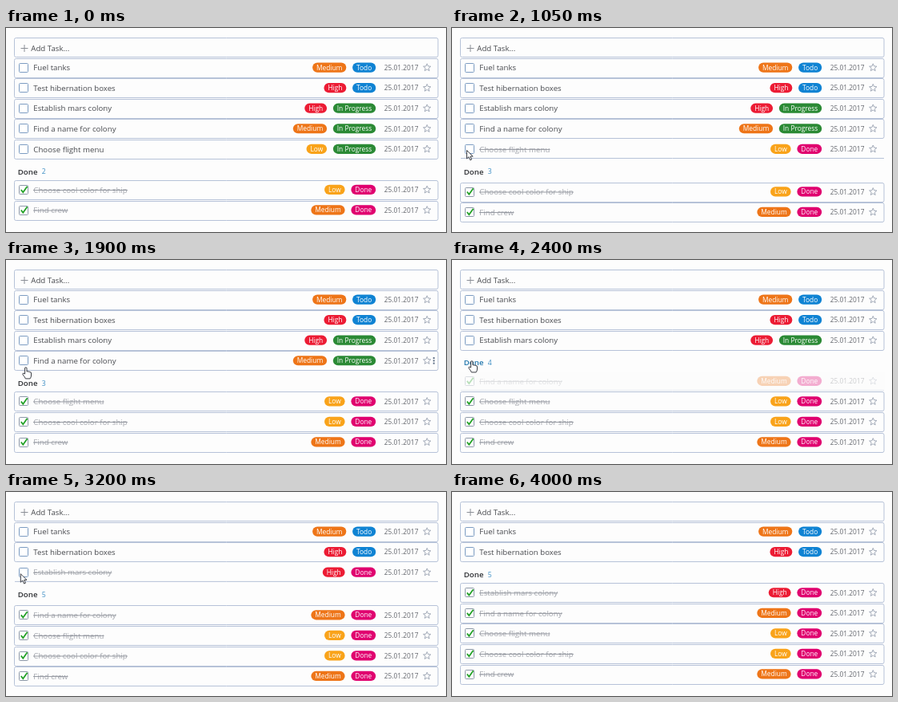
An HTML page with a canvas that plays this animation: 550 px wide and 256 px high, repeating every 4150 ms.

```html
<!DOCTYPE html>
<html lang="en">
<head>
<meta charset="utf-8">
<title>Task list</title>
<style>
html, body { margin: 0; width: 100%; height: 100%; overflow: hidden; background: #fdfdfd; }
canvas { display: block; width: 550px; height: 256px; }
</style>
</head>
<body>
<canvas id="stage" width="550" height="256"></canvas>
<script>
const ctx = document.getElementById('stage').getContext('2d');
const LOOP = 4150, STEP = 50, PITCH = 25.55;
const PAGE = '#fdfdfd', BORDER = '#b6c2d8';
const FONT = '"Open Sans", "Noto Sans", sans-serif';
const COLORS = {
  Medium: '#ee7518', High: '#ec1c34', Low: '#f9a31a',
  Todo: '#0f83d3', 'In Progress': '#2b8a35', Done: '#e0006f'
};
const TASKS = [
  { name: 'Fuel tanks', level: 'Medium', state: 'Todo' },
  { name: 'Test hibernation boxes', level: 'High', state: 'Todo' },
  { name: 'Establish mars colony', level: 'High', state: 'In Progress', click: 3150 },
  { name: 'Find a name for colony', level: 'Medium', state: 'In Progress', click: 2200 },
  { name: 'Choose flight menu', level: 'Low', state: 'In Progress', click: 1000 },
  { name: 'Choose cool color for ship', level: 'Low', state: 'Done' },
  { name: 'Find crew', level: 'Medium', state: 'Done' }
];
const MOVABLE = TASKS.filter(task => task.click);

// Pointer path: time, x, y
const PATH = [
  [50, -14, 112], [450, 19, 150], [750, 18, 153], [1300, 18, 153],
  [1700, 24.8, 136], [1900, 24.8, 135], [2150, 24.8, 127], [2450, 24.8, 127],
  [2700, 24.8, 103.2], [3150, 24.8, 103.2], [3300, -2.2, 99.5], [3400, -16, 98]
];

const clamp = v => Math.max(0, Math.min(1, v));
const ease = v => v * v * (3 - 2 * v);
const slotY = i => 49.7 + PITCH * i;

function pointerAt(t) {
  const i = PATH.findIndex(p => p[0] > t);
  if (i < 1) return null;
  const a = PATH[i - 1], b = PATH[i];
  const k = ease((t - a[0]) / (b[0] - a[0]));
  return { x: a[1] + (b[1] - a[1]) * k, y: a[2] + (b[2] - a[2]) * k };
}

function label(text, x, y, size, color, weight = 400) {
  ctx.font = `${weight} ${size}px ${FONT}`;
  ctx.fillStyle = color;
  ctx.fillText(text, x, y);
  return ctx.measureText(text).width;
}

function line(points, color, width) {
  ctx.beginPath();
  points.forEach(([x, y]) => ctx.lineTo(x, y));
  ctx.strokeStyle = color;
  ctx.lineWidth = width;
  ctx.stroke();
}

function box(x, y, w, h, r, stroke, fill) {
  ctx.beginPath();
  ctx.roundRect(x, y, w, h, r);
  if (fill) { ctx.fillStyle = fill; ctx.fill(); }
  if (stroke) { ctx.strokeStyle = stroke; ctx.lineWidth = 1; ctx.stroke(); }
}

function frame(y) {
  box(10.5, Math.round(y - 12) + 0.5, 529.5, 24, 2, BORDER, PAGE);
}

// Draws a pill ending at the given right edge, returns its left edge
function pill(text, right, y) {
  ctx.font = `400 8.4px ${FONT}`;
  const w = ctx.measureText(text).width + 9.8;
  box(right - w, y - 6.2, w, 12.2, 6.1, null, COLORS[text]);
  label(text, right - w + 4.9, y + 2.9, 8.4, '#fff');
  return right - w;
}

function star(x, y) {
  ctx.beginPath();
  for (let i = 0; i < 10; i++) {
    const a = -Math.PI / 2 + i * Math.PI / 5, r = i % 2 ? 2.2 : 4.9;
    ctx.lineTo(x + r * Math.cos(a), y + r * Math.sin(a));
  }
  ctx.closePath();
  ctx.strokeStyle = '#98a1b0';
  ctx.lineWidth = 0.9;
  ctx.stroke();
}

function row(task, y, { done, checked = done, alpha = 1, bare, hover }) {
  if (alpha === 0) return;
  if (bare) line([[11, y + 11.6], [540, y + 11.6]], BORDER, 1);
  else frame(y);
  box(16.5, Math.round(y - 6) + 0.5, 11, 11, 1, checked ? '#8d99a8' : '#7c9cc2', '#fff');
  if (checked) line([[18.8, y], [21.3, y + 3.2], [26.6, y - 4.2]], '#23a127', 1.8);
  const w = label(task.name, 34.3, y + 3.6, 9.7, done ? '#a3a6ad' : '#484a4f');
  if (done) line([[34, y + 0.5], [34.5 + w, y + 0.5]], '#969aa2', 1);
  const left = pill(done ? 'Done' : task.state, 462.2, y);
  pill(task.level, left - 7.8, y);
  label('25.01.2017', 472.8, y + 3.2, 8.35, '#62656c');
  star(526.3, y);
  if (hover) {
    ctx.fillStyle = '#64748a';
    for (let i = -1; i < 2; i++) ctx.fillRect(533.8, y - 1 + i * 3.3, 2, 2);
  }
  // Fade the row as a whole under a veil of the page colour
  ctx.globalAlpha = 1 - alpha;
  ctx.fillStyle = PAGE;
  ctx.fillRect(10, Math.round(y - 12), 531, 25);
  ctx.globalAlpha = 1;
}

function header(y, count, hot) {
  label('Done', 14.7, y + 3.4, 9.7, hot ? '#1f75ac' : '#2e3034', 600);
  label(count, 44.8, y + 3.2, 8.7, '#3f8fc4');
}

function outline(path, x, y) {
  ctx.save();
  ctx.translate(x, y);
  ctx.lineJoin = 'round';
  ctx.fillStyle = '#fff';
  ctx.strokeStyle = '#30333a';
  ctx.lineWidth = 0.95;
  const shape = new Path2D(path);
  ctx.fill(shape);
  ctx.stroke(shape);
  ctx.restore();
}

const ARROW = 'M.5 .5V11L3 8.7L4.8 12.8L6.6 12L4.9 8.1H8.2Z';
const HAND = 'M-1.2 8V1Q-1.2 -.3 0 -.3T1.2 1V5Q2.3 4.2 3.2 5.2Q4.4 4.6 5.1 5.7' +
  'Q6.7 5.3 6.7 7V10Q6.7 12 5.3 13.9H-.5Q-1 12 -2.8 10.2L-4 8.3Q-4 7 -2.8 7.1Z';

function draw(now) {
  const t = Math.floor((now % LOOP) / STEP) * STEP;
  ctx.fillStyle = PAGE;
  ctx.fillRect(0, 0, 550, 256);

  // Each completed task shifts the heading up one slot
  let headY = slotY(5) + 2.7, bump = 0, count = 2;
  for (const { click } of MOVABLE) {
    const age = t - click;
    headY -= PITCH * clamp((age - 50) / 100);
    if (age > 0 && age < 150) bump = 2.5 * (150 - age) / 100;
    if (age >= 0) count++;
  }

  const tip = pointerAt(t);
  const over = (y, r) => tip && tip.x > 10 && Math.abs(tip.y - y) < r;
  const onHead = over(headY, 9) && tip.x < 50;
  let hand = onHead;

  frame(24.3);
  line([[18.5, 25.5], [27.5, 25.5]], '#8b8f96', 1);
  line([[23, 21], [23, 30]], '#8b8f96', 1);
  label('Add Task...', 31.3, 28.6, 9.7, '#484a4f');

  TASKS.forEach((task, i) => {
    const age = task.click ? t - task.click : -1;
    if (task.state === 'Done') {
      row(task, slotY(i + 1) + bump, { done: true });
    } else if (age < 0) {
      const hover = over(slotY(i), 12.5);
      if (hover && tip.x > 15 && tip.x < 30) hand = true;
      row(task, slotY(i), { hover });
    } else if (age < 150) {
      row(task, slotY(i), {
        done: true, checked: false, bare: true,
        alpha: 1 - clamp((age - 50) / 80)
      });
    } else {
      const alpha = clamp((age - 150) / 160);
      row(task, slotY(i + 1) + bump, { done: true, alpha, bare: alpha < 0.5 });
    }
  });

  header(headY, count, onHead);
  if (tip) outline(hand ? HAND : ARROW, tip.x, tip.y);
}

const start = performance.now();
function tick() {
  draw(performance.now() - start);
  requestAnimationFrame(tick);
}
tick();
</script>
</body>
</html>
```
